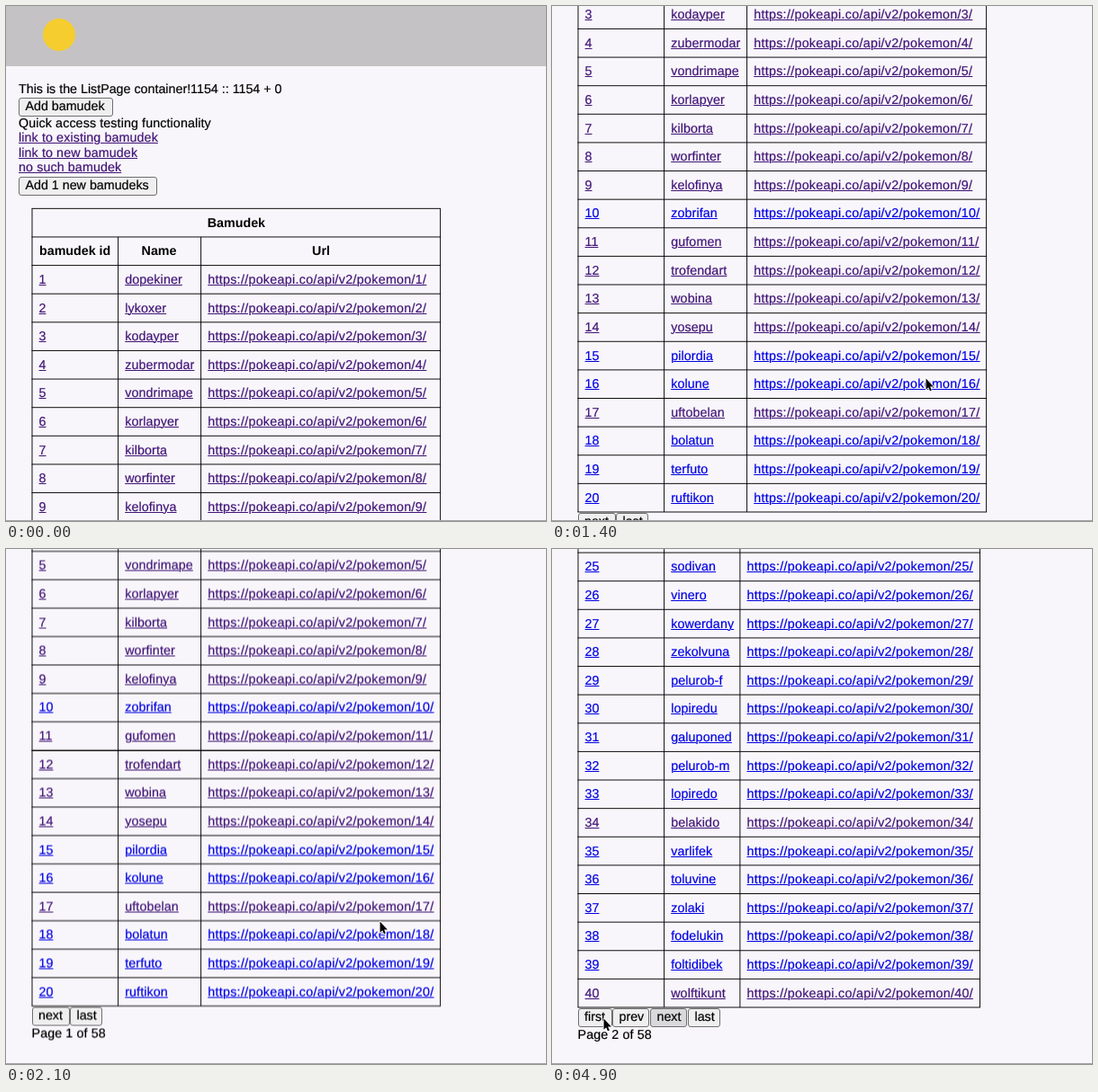
An HTML page for the animation above (5 s loop, 600 by 573 pixels).

```html
<!DOCTYPE html>
<html lang="en">
<head>
<meta charset="utf-8">
<title>List page</title>
<style>
html, body { margin: 0; width: 100%; height: 100%; overflow: hidden; background: #f8f6fa; }
#stage { position: relative; width: 600px; height: 573px; overflow: hidden; background: #f8f6fa;
  font: 14.28px "Liberation Sans", Arial, sans-serif; color: #000; text-rendering: geometricPrecision;
  -webkit-text-stroke: .2px; }
#stage * { position: absolute; box-sizing: border-box; }
#doc, .page, .grid { left: 0; top: 0; width: 600px; height: 984px; }
.grid path { fill: none; stroke: #000; stroke-width: .95; }
#bar { width: 600px; height: 67px; background: #c4c2c4; }
#logo { left: 41px; top: 14px; width: 36px; height: 36px; border-radius: 50%; background: #f5cd2f; }
#edge { left: 0; top: 572px; width: 600px; height: 1px; background: #a5a4a7; }
.t { line-height: 18px; white-space: pre; }
.b { font-weight: bold; -webkit-text-stroke: 0; }
.s { letter-spacing: .11px; }
.u { letter-spacing: .3px; }
.new, .old { text-decoration: underline; text-decoration-thickness: 1px; text-underline-offset: 1px; }
.new { color: #0000e4; }
.old { color: #411477; }
.btn { height: 21px; background: #efefef; border: 1px solid #6e6e70; border-radius: 3px; }
.down { background: #d9d8da; }
#cursor { left: 0; top: 0; width: 13px; height: 18.6px; overflow: visible; }

#doc, #cursor, .page { animation: scroll 5s -20ms step-end infinite; }
#cursor { animation-name: point; }
#p1 { animation-name: leave; }
#p2 { animation-name: enter; }
@keyframes leave { 0% { opacity: 1 } 88%, 100% { opacity: 0 } }
@keyframes enter { 0% { opacity: 0 } 88%, 100% { opacity: 1 } }
@keyframes scroll {
  0% { transform: translateY(0) }
  14% { transform: translateY(-4px) }
  16% { transform: translateY(-14px) }
  18% { transform: translateY(-32px) }
  20% { transform: translateY(-66px) }
  22% { transform: translateY(-124px) }
  24% { transform: translateY(-218px) }
  26% { transform: translateY(-300px) }
  28% { transform: translateY(-358px) }
  30% { transform: translateY(-394px) }
  32% { transform: translateY(-411px) }
  34% { transform: translateY(-414px) }
  36% { transform: translateY(-415px) }
  40% { transform: translateY(-414px) }
  42% { transform: translateY(-412.5px) }
  44% { transform: translateY(-412px) }
  46%, 100% { transform: translateY(-411px) }
}
@keyframes point {
  0% { transform: translate(440px, 600px) }
  6% { transform: translate(436px, 560px) }
  8% { transform: translate(428px, 500px) }
  10% { transform: translate(420px, 445px) }
  12% { transform: translate(415px, 414px) }
  50% { transform: translate(385px, 420px) }
  52% { transform: translate(325px, 433px) }
  54% { transform: translate(258px, 448px) }
  56% { transform: translate(202px, 460px) }
  58% { transform: translate(155px, 475px) }
  60% { transform: translate(118px, 490px) }
  62% { transform: translate(90px, 503px) }
  64% { transform: translate(72px, 513px) }
  66% { transform: translate(61px, 519px) }
  86% { transform: translate(59px, 521px) }
  88%, 100% { transform: translate(57px, 522px) }
}
</style>
</head>
<body>
<div id="stage">
  <div id="doc">
    <div id="bar"></div>
    <div id="logo"></div>
    <div id="p1" class="page"></div>
    <div id="p2" class="page"></div>
  </div>
  <div id="edge"></div>
  <svg id="cursor" viewBox="0 0 14 20">
    <path d="M0.6 0.6V13.6L3.4 11L5.4 15.4L7.4 14.5L5.5 10.2H9.6Z" fill="#000" stroke="#fff" stroke-width="1.7" stroke-linejoin="round" paint-order="stroke"/>
  </svg>
</div>
<script>
const $ = id => document.getElementById(id);

function add(parent, cls, x, y, w) {
  const el = document.createElement('div');
  el.className = cls;
  el.style.left = x + 'px';
  el.style.top = y + 'px';
  if (w) el.style.width = w + 'px';
  parent.appendChild(el);
  return el;
}

// y is the baseline
function text(parent, x, y, str, cls = '') {
  add(parent, 't ' + cls, x, y - 14).textContent = str;
}

function button(parent, x, y, w, str, cls = '') {
  add(parent, 'btn ' + cls, x, y, w);
  text(parent, x + 7.5, y + 15, str);
}

// centre of the rule above row n
const rowY = n => 225.35 + 31.62 * n;
const baseY = n => Math.round(rowY(n + 0.5) + 5.5);

function grid(page, rows, cols) {
  const [l, , , r] = cols;
  let d = '';
  for (let n = 0; n <= rows; n++) d += `M${l - 0.5} ${rowY(n)}H${r + 0.5}`;
  cols.forEach((x, i) => d += `M${x} ${rowY(i % 3 ? 1 : 0)}V${rowY(rows)}`);
  page.insertAdjacentHTML('beforeend', `<svg class="grid"><path d="${d}"/></svg>`);
}

function table(page, first, names, visited, cols) {
  const [l, a, b, r] = cols;
  grid(page, names.length + 2, cols);
  text(page, (l + r) / 2 - 32, baseY(0), 'Bamudek', 'b');
  text(page, l + 8, baseY(1), 'bamudek id', 'b');
  text(page, (a + b) / 2 - 20, baseY(1), 'Name', 'b');
  text(page, (b + r) / 2 - 9.5, baseY(1), 'Url', 'b');
  names.forEach((name, i) => {
    const id = first + i, y = baseY(i + 2);
    const link = visited.includes(id) ? 'old' : 'new';
    text(page, l + 7.6, y, id, link);
    text(page, a + 7.6, y, name, 's ' + link);
    text(page, b + 7.6, y, `https://pokeapi.co/api/v2/pokemon/${id}/`, 'u ' + link);
  });
}

const doc = $('doc'), p1 = $('p1'), p2 = $('p2');

text(doc, 14, 98, 'This is the ListPage container!1154 :: 1154 + 0');
button(doc, 14, 102, 105, 'Add bamudek');
text(doc, 14, 136, 'Quick access testing functionality', 's');
text(doc, 14, 152, 'link to existing bamudek', 's old');
text(doc, 14, 169, 'link to new bamudek', 's old');
text(doc, 14, 185, 'no such bamudek', 's old');
button(doc, 14, 190, 154, 'Add 1 new bamudeks');

table(p1, 1,
  ('dopekiner lykoxer kodayper zubermodar vondrimape korlapyer kilborta worfinter kelofinya zobrifan ' +
   'gufomen trofendart wobina yosepu pilordia kolune uftobelan bolatun terfuto ruftikon').split(' '),
  [1, 2, 3, 4, 5, 6, 7, 8, 9, 11, 12, 13, 14, 17], [29, 124.6, 216.6, 482.6]);
button(p1, 28.5, 922, 42, 'next');
button(p1, 71, 922, 36, 'last');
text(p1, 28.5, 957, 'Page 1 of 58', 's');

table(p2, 21,
  ('tolenar budekin pavorel fenadu sodivan vinero kowerdany zekolvuna pelurob-f lopiredu ' +
   'galuponed pelurob-m lopiredo belakido varlifek toluvine zolaki fodelukin foltidibek wolftikunt').split(' '),
  [34, 40], [29, 124.6, 208.9, 475.5]);
button(p2, 28.5, 922, 38, 'first');
button(p2, 67, 922, 41, 'prev');
button(p2, 109, 922, 41, 'next', 'down');
button(p2, 151, 922, 36, 'last');
text(p2, 28.5, 957, 'Page 2 of 58', 's');
</script>
</body>
</html>
```
